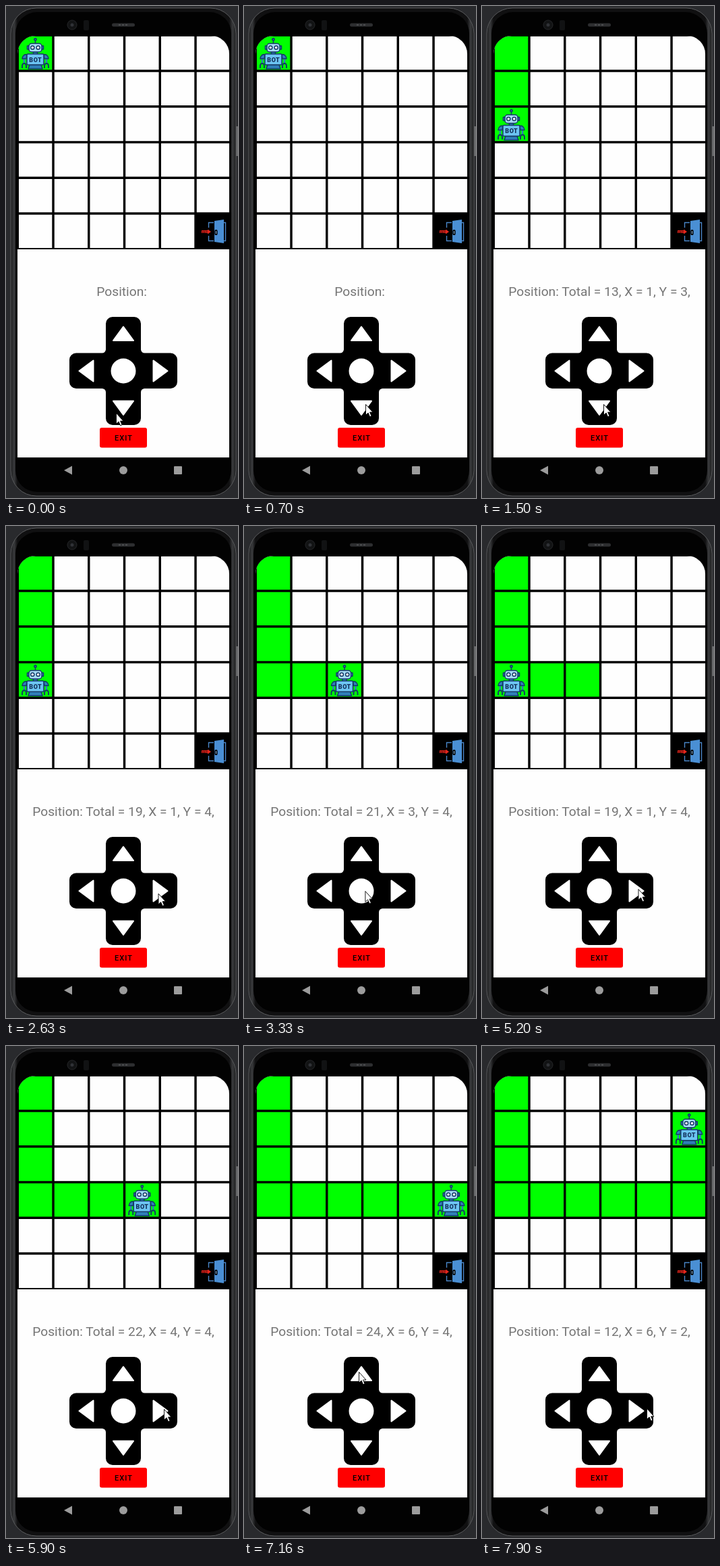
An HTML page for the animation above (8 s loop, 344 by 728 pixels).

```html
<!DOCTYPE html>
<html lang="en">
<head>
<meta charset="utf-8">
<title>Robot grid</title>
<style>
  html, body { margin: 0; width: 100%; height: 100%; overflow: hidden; background: #292a2d; }
  svg { display: block; }
  text { font-family: Roboto, sans-serif; text-anchor: middle; }
</style>
</head>
<body>
<svg width="344" height="728" viewBox="0 0 344 728">
  <defs>
    <clipPath id="screen"><path d="M17 668V71a27 27 0 0 1 27-27H304a27 27 0 0 1 27 27V668z"/></clipPath>
    <linearGradient id="rim">
      <stop offset="0" stop-color="#1b1c1d"/><stop offset=".015" stop-color="#3a3b3d"/>
      <stop offset=".03" stop-color="#101011"/><stop offset=".97" stop-color="#101011"/>
      <stop offset=".985" stop-color="#3a3b3d"/><stop offset="1" stop-color="#1b1c1d"/>
    </linearGradient>
  </defs>

  <!-- phone body -->
  <rect x="341" y="178" width="3" height="44" fill="#6b6c6e"/>
  <rect x="7" y="3" width="334" height="722" rx="38" fill="url(#rim)" stroke="#58595b"/>
  <rect x="14" y="9" width="320" height="710" rx="32" fill="#020202"/>
  <circle cx="98" cy="28" r="7" fill="#121314" stroke="#252628"/>
  <circle cx="98" cy="28" r="2.5" fill="#303236"/>
  <rect x="115" y="21" width="8" height="15" rx="2" fill="#111213"/>
  <rect x="157" y="25.500" width="34" height="5" rx="2.500" fill="#2d2e30"/>
  <path d="M167 28h15" stroke="#6b6c6e" stroke-dasharray="3 2"/>

  <!-- app -->
  <g clip-path="url(#screen)">
    <path fill="#fefefe" d="M17 44h314v624H17z"/>
    <path d="M17 44h314v316H17z"/>
    <g id="cells"></g>
    <g id="door">
      <path fill="#000" d="M280 307h51v52h-51z"/>
      <path fill="none" stroke="#4a86c8" stroke-width="1.400" d="M308 320.500h-7.500V328M300.500 340v7.500H308M323 320.500h2.500v27H323"/>
      <path fill="#4a8fd4" d="M309 318l14-2v35l-14-2z"/>
      <rect x="309.500" y="331" width="4" height="8" rx="1.500"/>
      <path d="M311.500 333v4" stroke="#9cc4ea"/>
      <path fill="#e8261c" d="M290 332h9v-1.500l5 3.500-5 3.500V336h-9z"/>
      <text x="295" y="335.500" font-size="4" font-weight="700" fill="#300">EXIT</text>
    </g>
    <g id="bot" stroke="#143a66" stroke-width="1.500" stroke-linejoin="round">
      <path fill="none" d="M24.500 5v6"/>
      <circle cx="24.500" cy="4.500" r="1.700" fill="#2b6ca8"/>
      <path fill="#2f7fb8" d="M12.500 14h3v5h-3zM33.500 14h3v5h-3zM21.500 23h6v4h-6zM16 42h17l2 6H14z"/>
      <rect x="15" y="10.500" width="19" height="12.500" rx="4" fill="#a6dcf5"/>
      <circle cx="20.300" cy="16.500" r="2.600" fill="#fff"/>
      <circle cx="28.700" cy="16.500" r="2.600" fill="#fff"/>
      <path fill="none" stroke="#2f7fb8" stroke-width="2.500" d="M8 30v10M41 30v10"/>
      <path fill="#2f7fb8" d="M12 27q-6-1-7 6h6zM37 27q6-1 7 6h-6z"/>
      <path fill="none" stroke-width="2" d="M5 47v-3q0-4 3-4t3 4v3M38 47v-3q0-4 3-4t3 4v3"/>
      <rect x="12" y="26" width="25" height="16" rx="1.500" fill="#6cc4f2"/>
      <text x="24.800" y="37.500" font-size="9" font-weight="900" letter-spacing=".6" stroke="none" fill="#12305a">BOT</text>
    </g>
    <text id="label" x="174" y="429" font-size="19.200" fill="#757575" xml:space="preserve"></text>

    <!-- pad -->
    <path d="M158 460h32a10 10 0 0 1 10 10v38a5.500 5.500 0 0 0 5.500 5.500H244a10 10 0 0 1 10 10V556a10 10 0 0 1-10 10H205.500a5.500 5.500 0 0 0-5.500 5.500V610a10 10 0 0 1-10 10H158a10 10 0 0 1-10-10V571.500a5.500 5.500 0 0 0-5.500-5.500H104a10 10 0 0 1-10-10V523.500a10 10 0 0 1 10-10H142.500a5.500 5.500 0 0 0 5.500-5.500V470a10 10 0 0 1 10-10z"/>
    <circle cx="174" cy="540" r="18.500" fill="#fff"/>
    <path fill="#fff" stroke="#fff" stroke-width="2" stroke-linejoin="round" d="M174 474.500l15 20.500h-30zM174 605l15-20.500h-30zM108.500 540l21-15.500v31zM239.500 540l-21-15.500v31z"/>
    <rect x="139" y="624" width="70" height="29.500" rx="3" fill="#f00"/>
    <text x="174.500" y="643" font-size="11" font-weight="500" letter-spacing="1.100">EXIT</text>
  </g>

  <!-- navigation bar -->
  <g fill="#9c9c9c">
    <path d="M86 687l12-6.500v13z"/>
    <circle cx="174" cy="687" r="6"/>
    <rect x="249" y="681" width="12" height="12" rx="1"/>
  </g>
  <path id="cursor" fill="#fff" stroke="#000" stroke-width=".9" d="M.5.5V16.300L4.100 13 6.600 18.800 9 17.800 6.600 12.100H11z"/>
</svg>
<script>
const LOOP = 8000, SIZE = 6, PITCH = 52.75, LEFT = 19, TOP = 45;
const $ = id => document.getElementById(id);

// [time, column, row]
const moves = [
  [0, 1, 1], [1030, 1, 2], [1500, 1, 3], [2060, 1, 4], [2930, 2, 4], [3200, 3, 4],
  [3860, 2, 4], [4060, 1, 4], [5430, 2, 4], [5660, 3, 4], [5900, 4, 4], [6060, 5, 4],
  [6260, 6, 4], [7400, 6, 3], [7600, 6, 2]
];
// [time, x, y]
const path = [
  [0, 163, 602], [130, 163, 602], [400, 177, 566], [700, 180, 589], [2030, 180, 589],
  [2360, 218, 551], [2530, 218, 551], [2630, 225.500, 543.500], [3170, 225.500, 543.500],
  [3530, 116, 535], [4800, 116, 535], [5230, 233, 537], [5400, 233, 537], [5500, 234, 537],
  [6870, 234, 537], [7160, 170, 482], [7570, 170, 482], [7900, 244, 536], [LOOP, 244, 536]
];

const cells = [];
for (let i = 0; i < SIZE * SIZE; i++) {
  const cell = document.createElementNS("http://www.w3.org/2000/svg", "rect");
  cell.setAttribute("x", LEFT + i % SIZE * PITCH);
  cell.setAttribute("y", TOP + Math.floor(i / SIZE) * PITCH);
  cell.setAttribute("width", 49.3);
  cell.setAttribute("height", 49.3);
  cells.push($("cells").appendChild(cell));
}

const place = (id, x, y) => $(id).setAttribute("transform", `translate(${x} ${y})`);

function drawCursor(t) {
  const i = path.findIndex(p => p[0] > t);
  const [t0, x0, y0] = path[i - 1], [t1, x1, y1] = path[i];
  const k = (t - t0) / (t1 - t0), e = k * k * (3 - 2 * k);
  place("cursor", x0 + (x1 - x0) * e, y0 + (y1 - y0) * e);
}

function draw(now) {
  const t = now % LOOP;
  const done = moves.filter(m => m[0] <= t);
  const visited = new Set(done.map(([, x, y]) => (y - 1) * SIZE + x));
  cells.forEach((cell, i) => cell.setAttribute("fill", visited.has(i + 1) ? "#0f0" : "#fefefe"));

  const [, x, y] = done[done.length - 1];
  place("bot", LEFT + (x - 1) * PITCH, TOP + (y - 1) * PITCH);
  $("label").textContent = "Position: " +
    (done.length > 1 ? `Total = ${(y - 1) * SIZE + x}, X = ${x}, Y = ${y},` : "");
  drawCursor(t);
}

const start = performance.now();
function tick() {
  draw(performance.now() - start);
  requestAnimationFrame(tick);
}
tick();
</script>
</body>
</html>
```
